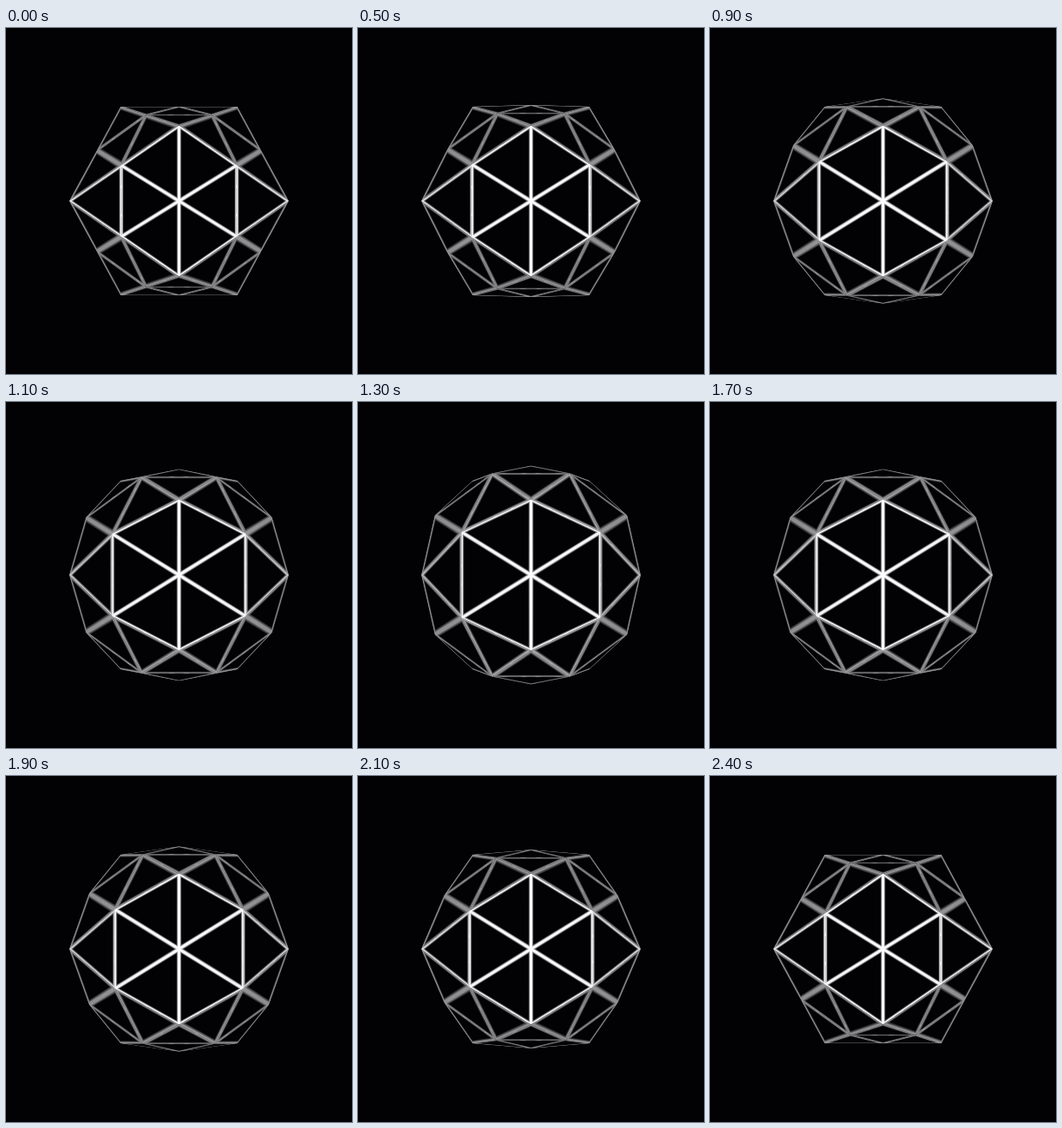
Recreate the animation shown at these times as an HTML page with a canvas. Size 400 px wide and 400 px high, loop 2500 ms.

```html
<!DOCTYPE html>
<html lang="en">
<head>
<meta charset="utf-8">
<title>Geodesic sphere</title>
<style>
  html, body { margin: 0; width: 100%; height: 100%; overflow: hidden; background: #020204; }
  canvas { display: block; width: 400px; height: 400px; }
</style>
</head>
<body>
<canvas id="stage" width="400" height="400"></canvas>
<script>
const ctx = document.getElementById('stage').getContext('2d');
const PHI = (1 + Math.sqrt(5)) / 2;
const UNIT = 67.35;
const EYE = [0, 0, 480];
const BACK = '#020204';
const BORDER = 1.45, MAX_BLUR = 2;
const SOFT = [0.65, 1, 1.35];
const BULGE = Math.hypot(1, PHI) / PHI - 1;
const STEP = 100, STEPS = 25, PEAK = 14, RISE = 10;

const add = (a, b) => a.map((v, i) => v + b[i]);
const sub = (a, b) => a.map((v, i) => v - b[i]);
const scale = (a, s) => a.map(v => v * s);
const dot = (a, b) => a[0] * b[0] + a[1] * b[1] + a[2] * b[2];
const cross = (a, b) => [
  a[1] * b[2] - a[2] * b[1],
  a[2] * b[0] - a[0] * b[2],
  a[0] * b[1] - a[1] * b[0]
];
const dist = (a, b) => Math.hypot(...sub(a, b));

// Icosahedron: cyclic permutations of (0, ±1, ±PHI)
const corners = [];
for (const s of [-1, 1]) {
  for (const t of [-PHI, PHI]) {
    corners.push([0, s, t], [s, t, 0], [t, 0, s]);
  }
}
const points = corners.map(c => scale(c, UNIT));

const joined = (a, b) => Math.abs(dist(a, b) - 2 * UNIT) < 1;
const faces = [];
points.forEach((a, i) => points.forEach((b, j) => points.forEach((c, k) => {
  if (i < j && j < k && joined(a, b) && joined(b, c) && joined(a, c)) faces.push([a, b, c]);
})));

// Four triangles per face, edge midpoints pushed outwards by `lift`
function split([a, b, c], lift) {
  const mid = (p, q) => scale(add(p, q), lift / 2);
  const ab = mid(a, b), bc = mid(b, c), ca = mid(c, a);
  return [[a, ab, ca], [b, bc, ab], [c, ca, bc], [ab, bc, ca]];
}

// Cosine between the outward normal and the line of sight
function facing([a, b, c]) {
  const n = cross(sub(b, a), sub(c, a));
  const sight = sub(EYE, scale(add(add(a, b), c), 1 / 3));
  return Math.sign(dot(n, a)) * dot(n, sight) / (Math.hypot(...n) * Math.hypot(...sight));
}

// Shrinks a triangle towards its incentre so that every side moves in by `w`
function inset([a, b, c], w) {
  const la = dist(b, c), lb = dist(c, a), lc = dist(a, b);
  const girth = la + lb + lc;
  const centre = scale(add(add(scale(a, la), scale(b, lb)), scale(c, lc)), 1 / girth);
  const radius = Math.hypot(...cross(sub(b, a), sub(c, a))) / girth;
  return [a, b, c].map(p => add(centre, scale(sub(p, centre), 1 - w / radius)));
}

function trace(tri) {
  tri.forEach(([x, y, z], i) => {
    const f = EYE[2] / (EYE[2] - z);
    ctx[i ? 'lineTo' : 'moveTo'](200 + x * f, 200 + y * f);
  });
  ctx.closePath();
}

// Soft white border, wider and greyer on tilted faces
function drawFace({ tri, cos }) {
  const blur = Math.min(1 / Math.abs(cos), MAX_BLUR);
  ctx.beginPath();
  trace(tri);
  ctx.fillStyle = BACK;
  ctx.fill();
  ctx.globalCompositeOperation = 'lighter';
  ctx.fillStyle = `rgba(255, 255, 255, ${1.1 / (SOFT.length * blur)})`;
  for (const s of SOFT) {
    ctx.beginPath();
    trace(tri);
    trace(inset(tri, BORDER * blur * s));
    ctx.fill('evenodd');
  }
  ctx.globalCompositeOperation = 'source-over';
}

function draw(level) {
  ctx.fillStyle = BACK;
  ctx.fillRect(0, 0, 400, 400);
  const shapes = faces.flatMap(f => split(f, 1 + BULGE * level))
    .map(tri => ({ tri, cos: facing(tri) }));
  shapes.filter(s => s.cos <= 0).forEach(drawFace);
  shapes.filter(s => s.cos > 0).forEach(drawFace);
}

function tick() {
  const step = Math.floor(performance.now() / STEP) % STEPS;
  draw(Math.max(0, RISE - Math.abs(step - PEAK)) / RISE);
  requestAnimationFrame(tick);
}
tick();
</script>
</body>
</html>
```
